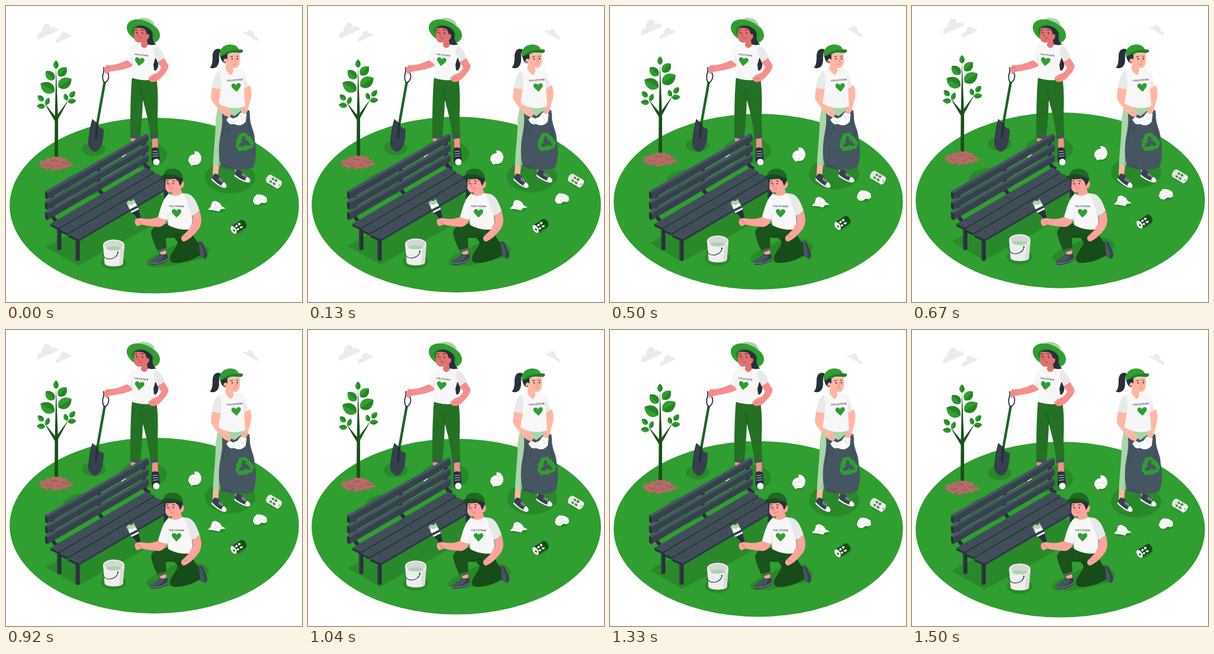
Recreate the animation shown at these times as an HTML page with a canvas. Size 500 by 500 pixels, loop 1.54 s.

```html
<!DOCTYPE html>
<html lang="en">
<head>
<meta charset="utf-8">
<title>Volunteers in the park</title>
<style>
html, body { margin: 0; height: 100%; overflow: hidden; background: #fff; }
canvas { display: block; width: 500px; height: 500px; }
</style>
</head>
<body>
<canvas id="stage"></canvas>
<script>
const canvas = document.getElementById('stage');
const ctx = canvas.getContext('2d');
const ratio = window.devicePixelRatio || 1;
canvas.width = canvas.height = 500 * ratio;

const LOOP = 1540, BOB = 1500, STEP = 1000 / 24, LIFT = 10;
const GREEN = '#309e30', SHADE = '#29892a', PALE = '#a9d5a9', DEEP = '#1a501b', LEG = '#247024';
const INK = '#263039', SLATE = '#36414d', STEEL = '#465562', WHITE = '#f7f7f7';
const ROSE = '#f58f8e', FACE = '#e27270', PEACH = '#ffb7a4', CORAL = '#ffa39d';

function fill(color, d) {
  ctx.fillStyle = color;
  ctx.fill(new Path2D(d));
}
function line(color, width, d) {
  ctx.strokeStyle = color;
  ctx.lineWidth = width;
  ctx.lineCap = ctx.lineJoin = 'round';
  ctx.stroke(new Path2D(d));
}
function oval(color, x, y, rx, ry, angle = 0) {
  ctx.fillStyle = color;
  ctx.beginPath();
  ctx.ellipse(x, y, rx, ry, angle, 0, Math.PI * 2);
  ctx.fill();
}
function at(x, y, degrees, draw) {
  ctx.save();
  ctx.translate(x, y);
  ctx.rotate(degrees * Math.PI / 180);
  draw();
  ctx.restore();
}

function badge(x, y, angle, size, heartX, heartY) {
  at(x, y, angle, () => {
    ctx.fillStyle = INK;
    ctx.font = `bold ${size}px "Liberation Serif", serif`;
    ctx.textAlign = 'center';
    ctx.textBaseline = 'middle';
    ctx.fillText('VOLUNTEER', 0, 0);
  });
  at(heartX, heartY, angle, () =>
    fill(GREEN, 'M0 7.5C-3 4-8 0-8-3C-8-8-2-8 0-4C2-8 8-8 8-3C8 0 3 4 0 7.5Z'));
}

function leaf(x, y, length, width, angle) {
  at(x, y, angle, () => {
    const h = length / 2;
    const side = w => `M0 ${-h}C${w * .75} ${-h * .4} ${w * .7} ${h * .7} 0 ${h}Z`;
    fill(GREEN, side(width) + side(-width));
    fill('#278527', side(width));
  });
}

function clouds() {
  const c = '#ebebeb';
  fill(c, 'M53 57C51 50 55 44 60 45C60 36 65 30 69 30C74 30 76 34 76 38C80 34 84 35 83 38C87 37 90 40 87 42Z');
  fill(c, 'M84 63C84 57 87 52 91 53C91 47 94 44 97 44C100 43 103 45 103 48C105 46 108 47 108 49C110 48 111 50 110 51Z');
  fill(c, 'M426 60C427 55 424 51 420 52C420 46 416 42 414 41C410 39 408 42 408 45C404 43 400 43 400 45Z');
}

function ground() {
  oval(GREEN, 250.5, 337.2, 244.3, 148.4);
  oval(SHADE, 130, 303, 34, 20);
  oval(SHADE, 148, 241.5, 20, 12);
  oval(SHADE, 232, 251, 40, 23);
  oval(SHADE, 378.5, 289.5, 42.5, 27);
  oval(SHADE, 181.5, 433, 21.5, 12.5);
  fill(SHADE, 'M67 407L122 438.500L300 342L245 310Z');
  fill(SHADE, 'M237 436C236 428 250 420 270 412C290 398 320 396 335 404C346 410 346 420 330 427C300 434 275 441 255 441C245 441 238 440 237 436Z');
}

function tree() {
  fill(DEEP, 'M82 258L82.500 192L84.500 104L88 192L88 258Z');
  fill(DEEP, 'M83 195L64 163L83 186ZM87.500 192L106 158L87.500 183Z');
  leaf(84.3, 99, 14, 8, 0);
  leaf(74.300, 117.500, 20, 13, -45);
  leaf(95.500, 111, 20, 13, 45);
  leaf(70, 138, 27, 17, -60);
  leaf(99.500, 130, 26, 17, 58);
  leaf(58.500, 156, 13, 8, -45);
  leaf(70, 161, 13, 7, 20);
  leaf(59, 169.500, 14, 8, -85);
  leaf(112, 149, 13, 8, 40);
  leaf(101, 154, 12, 7, -20);
  leaf(111.500, 160.500, 14, 8, 85);
  fill('#b46c67', 'M54 267L58 265L57 261L65 261L69 257L76 257L80 254L87 255L92 254L95 257L102 257L103 262L110 263L109 266L115 268L112 271L105 271L102 275L96 274L91 277L86 276L80 279L75 275L67 277L65 273L58 273L60 270Z');
  line('#965651', 1.3, 'M65 267L71 270L76 268M77 262L83 260L87 262M86 271L92 269M95 264L102 267L106 265M72 275L79 273');
}

function bucket() {
  fill('#eeeeee', 'M164 404L166.500 435C169 441.500 195 441.500 197.500 435L200 404Z');
  fill('#dddddd', 'M193 411L191 439C195 438 197 437 197.500 435L200 404Z');
  oval('#f7f7f7', 182, 404, 18, 9.5);
  oval('#d6d6d6', 182, 404, 16, 8);
  oval(PALE, 182, 409.5, 12.5, 3.5);
  line(INK, 1.1, 'M164 419C165 432 187 429 189 417');
  oval(INK, 189, 416, 1.2, 1.2);
}

function can(x, y, angle, body, mark) {
  oval(SHADE, x + 1, y + 3, 14, 8, angle * Math.PI / 180);
  at(x, y, angle, () => {
    fill(body, 'M-9-7.500L10-7.500C15-5 15 5 10 7.500L-9 7.500C-14 5-14-5-9-7.500Z');
    fill(mark, 'M-5-4L-1-5L0-2L-4-1ZM2-6L6-4L4-1L1-2ZM-6 2L-2 1L-1 4L-4 5ZM1 1L6 2L5 5L1 4Z');
  });
}

function cans() {
  can(451.5, 296, 31, '#dfeadc', '#467c47');
  at(451.5, 296, 31, () => {
    oval('#f2f2f2', 11, 0, 4, 7.5);
    oval('#a5aaa5', 12, 1, 1.2, 2.2);
  });
  can(393, 373, -32, '#174c1a', '#edf2ec');
  at(393, 373, -32, () => {
    oval('#f5f5f5', -10, 0, 4.2, 7.5);
    oval(INK, -10, 1, 1.2, 2.2);
  });
}

function litter() {
  oval(SHADE, 318, 268, 9, 3);
  fill('#fff', 'M308 262C308 256 310 253 315 251L319 250L318 246C325 244 330 251 330 258C329 266 323 270 318 268L313 270Z');
  line('#d5d5d5', 1, 'M311 260L317 257L322 260L326 257M319 251L323 257M315 265L321 264');
  oval(SHADE, 357, 346, 13, 2.5);
  fill('#fff', 'M341 344L346 339L348 331L353 329L358 331L362 334L364 338L371 342L363 343L360 347L351 345Z');
  line('#d5d5d5', 1, 'M347 340L354 342L361 339M354 333L355 339M364 339L360 344');
  oval(SHADE, 429, 335, 10, 2.5);
  fill('#fff', 'M417 330L419 323L424 318L433 319L440 323L441 330L437 333L432 332L426 336L420 335Z');
  line('#d5d5d5', 1, 'M421 328L426 323L433 325M426 331L432 327L438 329');
}

function shovel() {
  fill(SLATE, 'M146 191L153 197L158 205L165 208C165 222 163 232 160 238C157 243 153 247 149 246C143 244 139 238 139 233C140 222 142 204 146 191Z');
  line(INK, 1, 'M146 192C142 205 140 222 139.500 233');
  line('#1e6426', 4.3, 'M166.500 130L154 200');
  line(INK, 4, 'M154 199L152 222');
  line(INK, 1.8, 'M165 104L165 112C162 118 163 127 167 130C172 127 175 121 173 115L169 108');
}

function gardener() {
  // hat, hair and head
  fill(INK, 'M246 84C258 88 260 101 254 108C250 112 246 104 246 95Z');
  oval(GREEN, 232, 43, 29.5, 18.5, .4);
  fill(PALE, 'M224 22C231 18 246 20 250 29L253 37C246 28 235 24 224 22Z');
  oval('#267f28', 231, 45, 19, 12, .35);
  fill(INK, 'M217 38C226 29 243 35 247 45C247 57 249 62 254 65L240 67L230 42Z');
  fill(FACE, 'M217 38C223 36 230 36 235 40L238 48C242 46 243 51 241 54C240 57 238 57 238 57L240 68C238 74 229 73 227 69L229 61C222 64 217 59 216 53Z');
  line(INK, 1.1, 'M218 41L221 40M228 40L232 41');
  oval(INK, 220.5, 45, 1, 1.4);
  oval(INK, 230.5, 46, 1, 1.4);
  line('#ad4e50', 1, 'M224 45L222 50L225 51');
  line('#963c42', 1, 'M225 55L229 54');

  // legs and shoes
  fill(ROSE, 'M211 221L219 222L217 231L211 228ZM247 222L256 221L257 243L247 243Z');
  fill('#fff', 'M194 253L201 249L203 251L196 256Z');
  fill(INK, 'M246 241C249 238 255 238 258 241L260 263C259 270 251 271 248 266C244 260 247 250 246 241Z');
  oval('#fff', 254, 263.5, 5.5, 5.5);
  line('#e0e0e0', .9, 'M248 246L256 245M248 250L257 249M248 254L257 253');
  fill(LEG, 'M213 119C226 127 245 127 254 121C257 140 257 165 256 185L257 222L244 223C242 200 237 180 231 158C231 180 228 205 227 224L210 222C210 190 210 150 213 119Z');
  line('#1a581c', 1.1, 'M231 160C231 152 230 146 227 139');
  fill('#3c5554', 'M210 219L227.500 220L227.500 225L210 223ZM243.500 219L257 218L257 223L244 225Z');

  // arms and shirt
  fill(ROSE, 'M206 91C195 96 186 99 177 100L169 100L165 107L168 115L176 111C190 109 206 106 214 101L212 91Z');
  line(FACE, .9, 'M168 105L175 104M168 109L174 108M199 94L202 96');
  fill(WHITE, 'M214 66L227 64C230 73 237 73 240 65L252 67L253 85L249 99L252 123C240 127 222 125 212 121L214 99L204 91C206 80 208 70 214 66Z');
  fill('#e9e9e9', 'M252 67C262 71 266 80 268 88C265 92 261 94 256 95L249 77Z');
  fill('#e9e9e9', 'M213 82L214 99L210 96Z');
  fill(ROSE, 'M256 95L267 88L274 99C276 104 271 112 262 121C256 128 248 130 243 127L240 122L247 116L258 112L262 104Z');
  line(FACE, .9, 'M245 124L252 121M261 108L256 113');
  badge(228.500, 83, 7, 3.8, 225.500, 94);
}

// Long slat seen from above: left corner, extent of its short side
function slat(x, y, ax, ay) {
  const run = 162, rise = -95, thick = 4;
  const quad = (color, x1, y1, dx, dy, ex, ey) =>
    fill(color, `M${x1} ${y1}l${dx} ${dy}l${ex} ${ey}l${-dx} ${-dy}Z`);
  quad('#2f3944', x + ax, y + ay, run, rise, 0, thick);
  quad(INK, x, y, ax, ay, 0, thick);
  quad('#414e5a', x, y, run, rise, ax, ay);
  for (const k of [.08, .49, .91])
    for (const m of [.3, .7])
      oval(INK, x + run * k + ax * m, y + rise * k + ay * m, 1, .8);
}

function bench() {
  for (const [x, top, bottom] of [[86, 372, 413], [117, 389, 431], [266, 296, 326]]) {
    fill(INK, `M${x} ${top}h7.500V${bottom - 2}q-3.500 3-7.500 0Z`);
    fill(SLATE, `M${x} ${top}h2.500V${bottom - 1}l-2.500-1Z`);
  }
  for (const [x, y] of [[79, 318], [157, 272], [233, 228]])
    line(INK, 6, `M${x} ${y}v34q0 8 8 12`);
  slat(75, 368, 13.5, 6.5);
  slat(90.5, 377.5, 13, 6);
  slat(105.5, 386.5, 17, 7.5);
  for (let i = 0; i < 3; i++) {
    ctx.save();
    ctx.translate(0, i * 17.4);
    fill(SLATE, 'M69 315L239 218Q241 217 241 220V226Q241 228 239 229L71 326.500Q69 327 69 325Z');
    fill(INK, 'M66 313L70 315.500V327L67 325Q66 324 66 322Z');
    fill(STEEL, 'M66 313L236 216Q238 215 241 218L70 316Z');
    ctx.restore();
  }
}

function sneaker(x, y, angle) {
  at(x, y, angle, () => {
    fill('#fff', 'M-14 1L-13 6C-5 8 7 9 14 6L15 3Z');
    fill(SLATE, 'M-14-5C-11-8-5-8-3-5C3-3 8-2 12 0C16 2 15 5 11 5C2 7-9 5-14 3Z');
    fill('#fff', 'M7-2C12-1 16 1 15 4C13 7 8 6 6 4Z');
    line('#eee', .9, 'M-3-4L-1 0M0-4L2 0M3-3L5 0');
  });
}

function collector() {
  // legs
  fill(PEACH, 'M350 266L360 268L358 288L349 286ZM387 274L397 275L395 285L387 284Z');
  sneaker(361, 295, 32);
  sneaker(400, 287, 24);
  fill(PALE, 'M359 163C370 172 395 175 408 166L411 190L373 202L362 268C358 271 352 270 350 268C349 260 355 212 354 192Z');
  fill('#92c394', 'M371 183L373 202L362 268L358 270C361 240 364 205 371 183Z');

  // bag with a recycling sign
  fill(STEEL, 'M365 183L372 179L386 186L396 178L411 176L411 192L368 200Z');
  fill('#fff', 'M372 192L377 187L384 190L391 187L396 180L405 181L410 188L406 197L394 204L378 201Z');
  line('#d3d3d3', 1, 'M378 192L382 197L389 193M396 184L399 192L405 187');
  fill(STEEL, 'M365 183C367 178 374 182 372 191C374 198 380 202 385 199C389 202 399 204 405 195C406 187 406 179 411 176L412 184C411 200 420 210 420 225C424 245 422 262 418 272C405 279 380 278 364 272C359 262 359 240 361 225C364 208 366 200 365 183Z');
  line('#35434f', 1, 'M370 196C369 206 366 212 366 222M409 192C408 203 414 211 414 222M377 204L374 215M365 268C372 272 378 270 382 274');
  for (let i = 0; i < 3; i++)
    at(402.5, 230.5, i * 120 - 8, () =>
      fill(GREEN, 'M-12-6L-6-16L4-16L9-9L12-10L10-1L1-4L4-6L0-12L-6-2Z'));

  // head
  fill(INK, 'M362 73C354 70 349 76 349 85C349 95 348 101 344 104C354 108 360 101 360 91C360 83 359 78 363 77Z');
  fill(INK, 'M362 82L377 78L377 96L370 97C364 94 362 89 362 82Z');
  fill(PEACH, 'M374 81L394 79C396 86 396 95 393 101C390 106 385 105 383 104L385 112L380 119L370 107L372 97C367 97 366 90 370 89C372 88 374 91 374 91Z');
  line(INK, 1, 'M379 86L383 85M389 85L392 85');
  oval(INK, 382, 89.5, 1, 1.4);
  oval(INK, 391, 89, 1, 1.4);
  line('#e0786f', 1, 'M387 88L389 93L386 94M383 98Q387 100 389 97');
  oval(INK, 370, 95, .9, .9);
  fill(GREEN, 'M361 86C359 74 367 65 379 65C387 65 392 69 393 73L400 74C401 77 398 80 393 79C382 78 372 80 361 86Z');
  fill('#257d27', 'M364 83C374 74 388 73 400 74C401 78 398 80 393 79C382 78 373 79 364 83Z');

  // shirt and arms
  fill(PEACH, 'M348 137L363 139L362 152L371 170L380 178C381 186 378 189 374 187L368 184C360 175 348 163 346 155Z');
  fill(PEACH, 'M401 139L412 134C415 142 415 150 414 155L408 176C407 183 401 184 397 180L402 166L402 152Z');
  line('#e88d7e', .9, 'M371 179L376 183M400 174L405 177M363 152L365 158');
  fill(WHITE, 'M362 109L370 105C373 112 377 115 380 117C383 114 385 110 385 106L397 106C405 109 408 119 409 135L402 140L404 169C391 175 371 173 359 164L363 139C358 140 352 139 348 137C350 126 353 113 362 109Z');
  fill('#e9e9e9', 'M361 110C364 121 364 130 363 140C357 140 351 139 348 137C350 126 353 112 361 110ZM401 117L402 140L409 135Z');
  badge(386.500, 125.500, -5, 4.3, 389, 137.5);
}

function painter() {
  // legs and shoes
  fill(CORAL, 'M259 411L270 410L271 422L262 423Z');
  fill(SLATE, 'M242 433C250 426 257 423 260 419C265 421 269 419 272 418L274 428C268 435 255 438 245 437Z');
  line('#7b8a94', 1.2, 'M243 434C255 436 265 433 273 427');
  fill(STEEL, 'M242 433C248 428 255 424 260 421L267 421C266 430 252 435 242 433Z');
  fill(STEEL, 'M320 404C321 397 328 395 332 400L339 416C341 422 339 427 335 427L324 421Z');
  fill(SLATE, 'M328 397L332 400L339 416C341 422 339 427 335 427C337 418 331 408 328 397Z');
  fill('#174b19', 'M275 380L312 376C317 390 321 397 326 401L328 421C318 428 300 434 286 434C277 434 275 428 279 419L291 400Z');
  fill('#1a531c', 'M245 383C246 373 258 368 275 368L306 377C302 388 292 394 270 391L271 412L257 416C252 405 247 395 245 383Z');
  line('#113b14', 1, 'M270 391C280 390 288 386 295 386M289 402L296 392');
  fill('#496b4b', 'M256 412L271 408L271 412L257 417Z');

  // head
  fill(INK, 'M265 287L275 290L273 314C268 311 266 305 268 300Z');
  fill(CORAL, 'M270 291L294 289L296 297C301 294 302 302 299 306C298 308 296 308 295 308L298 318C294 325 284 324 279 319L281 314C274 317 270 312 269 307Z');
  fill(INK, 'M267 289L296 286L299 293L297 299L294 304L291 296L286 292L268 293Z');
  line(INK, 1.1, 'M271 296L274 295M281 295L285 296');
  oval(INK, 273.5, 300, 1, 1.4);
  oval(INK, 282.5, 300, 1, 1.4);
  line('#d86565', 1, 'M277 299L275 304L278 305M278 309Q281 309 283 307');
  fill('#1f6923', 'M262 290C267 286 266 276 278 275C291 273 299 281 299 292C289 287 277 288 262 290Z');
  fill('#174d1a', 'M261 289C271 281 286 284 299 292C289 289 276 290 265 293Z');

  // brush
  at(216.5, 343, -27, () => {
    fill(PALE, 'M-7-15L-2-17L3-14L7-16L7-6L-7-6Z');
    fill('#fff', 'M-7-7L-4-11L0-7L4-9L7-6V-1H-7Z');
    fill(SLATE, 'M-7-3H7V1H-7Z');
    fill('#f5f5f5', 'M-7 1H7V4H-7Z');
    fill(INK, 'M-7 4H7L5 9L3 20L-2 20L-4 9Z');
  });

  // arms and shirt
  fill(CORAL, 'M260 355L273 360C268 371 262 374 255 373C245 372 235 371 229 369L222 372C217 369 217 362 219 360L226 358C238 361 250 360 260 355Z');
  line('#e57976', .9, 'M221 363L227 364M224 368L230 366');
  fill(WHITE, 'M276 317C282 322 290 322 298 316L311 319C319 325 324 336 327 346L314 354L316 376C303 380 286 377 274 370L273 360C267 361 262 359 257 356C261 342 266 322 276 317Z');
  fill('#e8e8e8', 'M300 317C316 315 323 332 326 346C323 351 318 354 313 354C309 342 305 326 300 317ZM275 344L272 360L275 371Z');
  fill(CORAL, 'M315 354C319 353 324 350 327 346C331 358 331 368 326 376C318 387 308 396 300 398C296 396 294 392 298 388C305 382 312 375 316 367Z');
  line('#e57976', .9, 'M300 388L306 390M316 365L311 374');
  badge(288, 338.500, 1, 4.1, 288, 350);
}

function bobOffset(time) {
  const frame = Math.floor((time % LOOP + 4) / STEP);
  const phase = ((frame + 1) * STEP / BOB) % 1;
  const rise = 1 - Math.abs(2 * phase - 1);
  return .5 - LIFT * rise;
}

function render(time) {
  ctx.setTransform(ratio, 0, 0, ratio, 0, 0);
  ctx.fillStyle = '#fff';
  ctx.fillRect(0, 0, 500, 500);
  ctx.save();
  ctx.translate(0, bobOffset(time));
  [clouds, ground, tree, bucket, cans, litter].forEach(draw => draw());
  ctx.restore();
  [shovel, gardener, bench, collector, painter].forEach(draw => draw());
}

const start = performance.now();
function tick() {
  render(performance.now() - start);
  requestAnimationFrame(tick);
}
tick();
</script>
</body>
</html>
```
